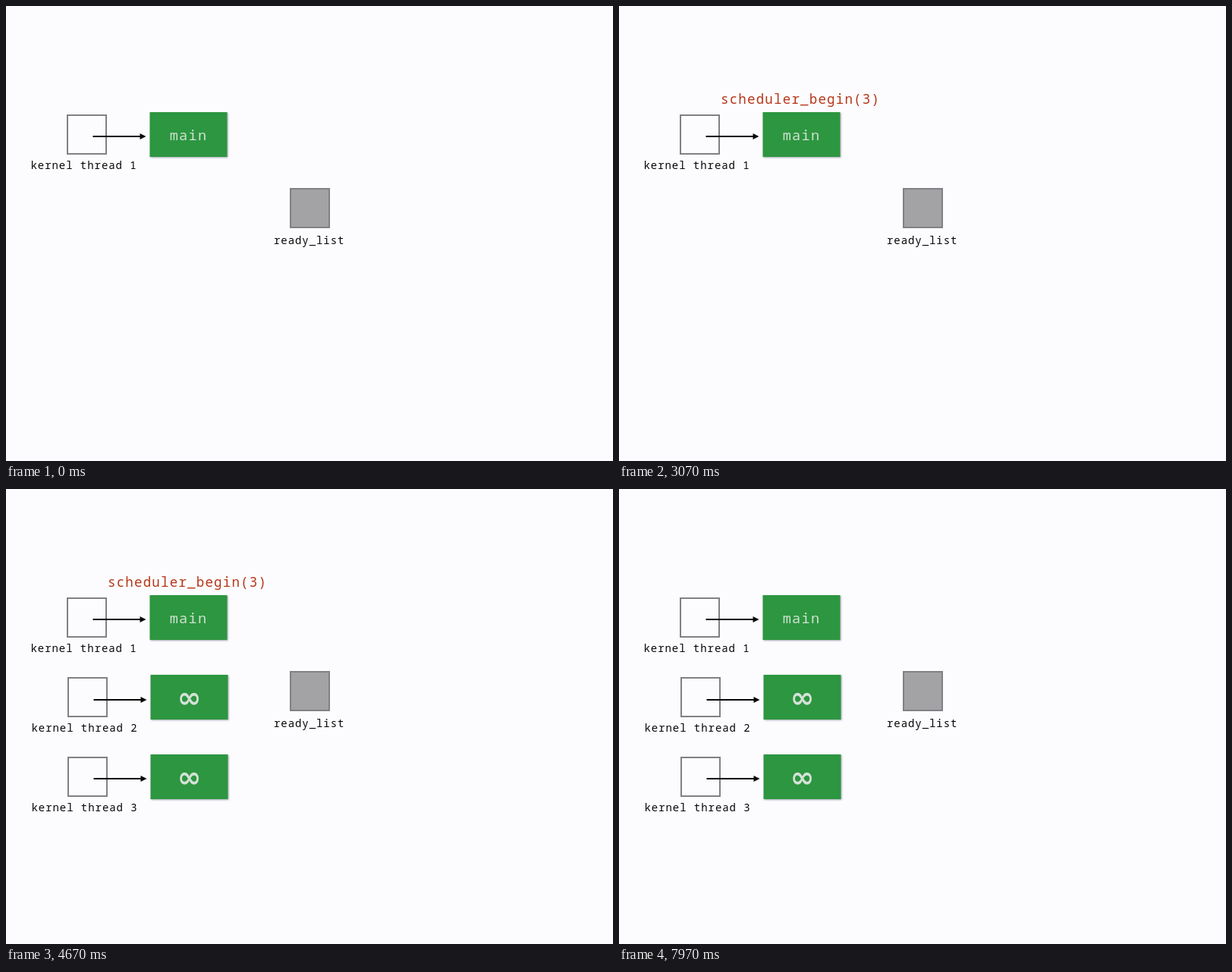
Recreate the animation shown at these times as an HTML page. Size 800 by 600 pixels, loop 8000 ms.

```html
<!DOCTYPE html>
<html lang="en">
<head>
<meta charset="utf-8">
<title>Scheduler threads</title>
<style>
  html, body { margin: 0; width: 100%; height: 100%; overflow: hidden; background: #fcfcfe; }
  svg { display: block; width: 800px; height: 600px; }
  text { font-family: "Noto Sans Mono", "DejaVu Sans Mono", monospace; letter-spacing: .067em; }
  .label { font-size: 14px; fill: #080808; }
  .frame { fill: none; stroke: #808086; stroke-width: 2; }
  .list { fill: #a3a3a5; }
  .task { fill: #2d9640; filter: drop-shadow(1.5px 1px 1px #50506880); }
  .name { font-size: 18.6px; font-weight: 300; fill: #cfe2d2; text-anchor: middle; }
  .infinity { font: bold 38px "DejaVu Sans", sans-serif; letter-spacing: 0; fill: #d5e2d8; text-anchor: middle; }
  .call { font-size: 17.5px; fill: #b5381a; }
</style>
</head>
<body>
<svg viewBox="0 0 800 600">
  <g id="main"></g>
  <g id="workers"></g>
  <rect class="frame list" x="375" y="241" width="51" height="51"/>
  <text class="label" x="353" y="314">ready_list</text>
  <text class="call" id="call" x="134" y="129">scheduler_begin(3)</text>
</svg>
<script>
const LOOP = 8000;
const byId = id => document.getElementById(id);
const progress = (t, from, to) => Math.min(1, Math.max(0, (t - from) / (to - from)));
const smooth = p => p * p * (3 - 2 * p);

// One kernel thread: its box, label, arrow and the task it runs.
function thread(number, x, y, arrowY, content) {
  return `
    <rect class="frame" x="${x}" y="${y}" width="51" height="51"/>
    <text class="label" x="${x - 48.5}" y="${y + 71}">kernel thread ${number}</text>
    <rect class="task" x="${x + 108.5}" y="${y - 4}" width="102" height="59"/>
    <path d="M${x + 33.5} ${arrowY}h64" stroke="#080808" stroke-width="2"/>
    <path d="M${x + 95.5} ${arrowY - 4}l8 4l-8 4z" fill="#080808"/>
    ${content}`;
}

const infinity = y => `<text class="infinity" x="241.5" y="${y}">∞</text>`;
byId('main').innerHTML = thread(1, 81, 144, 172, '<text class="name" x="240.5" y="177">main</text>');
byId('workers').innerHTML =
  thread(2, 82, 249, 278, infinity(288)) + thread(3, 82, 354, 382, infinity(393));

function draw(now) {
  const t = now % LOOP;
  const fall = progress(t, 870, 1660);
  const left = (1 - fall) ** 3;
  const call = byId('call');
  call.setAttribute('transform', `translate(${left * 20} ${-left * 140})`);
  call.setAttribute('opacity', (0.5 + fall / 2) * (1 - smooth(progress(t, 5400, 6700))));
  byId('workers').setAttribute('opacity', smooth(progress(t, 3770, 4700)));
  requestAnimationFrame(draw);
}
requestAnimationFrame(draw);
</script>
</body>
</html>
```
